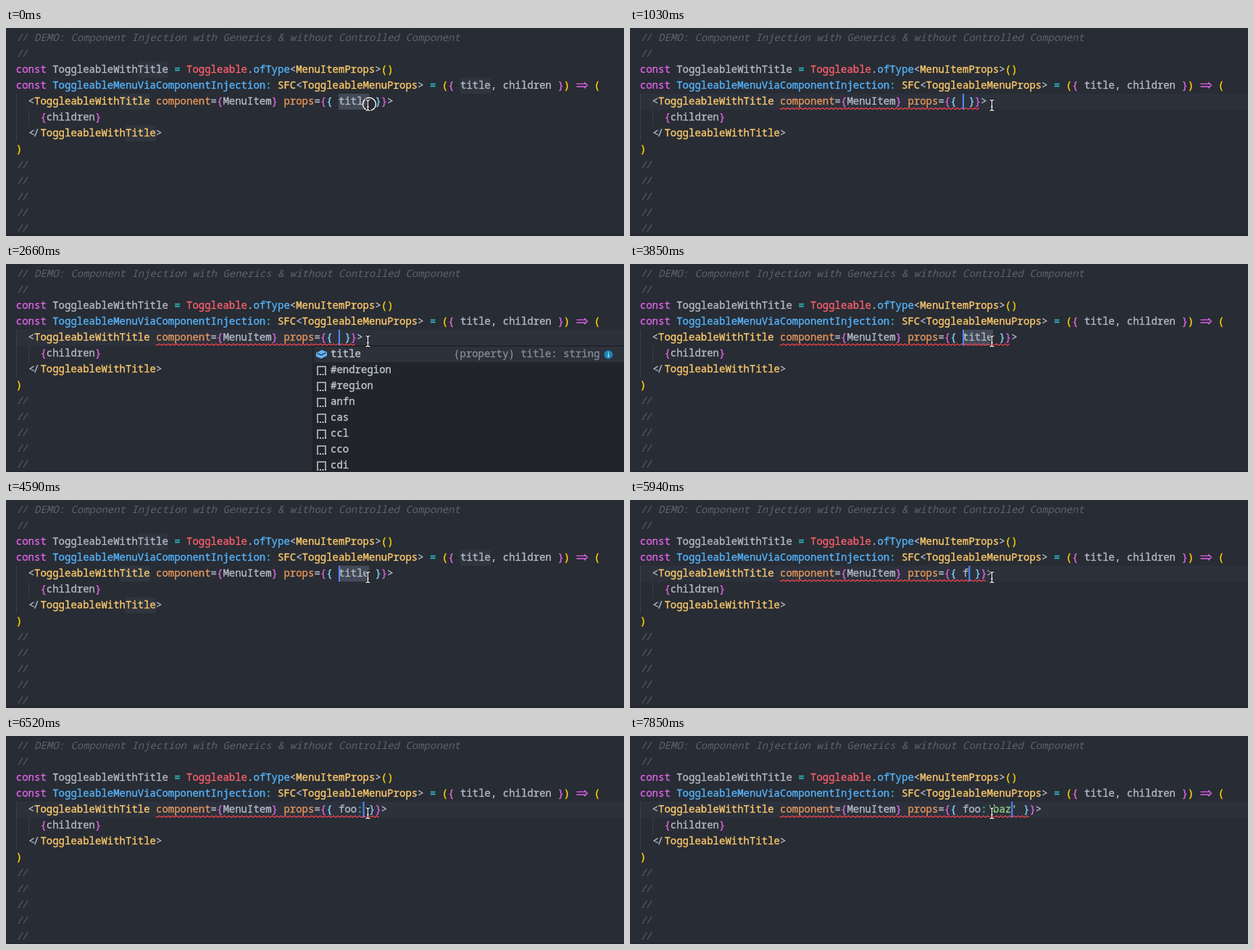
Write an HTML page that moves like this. It is 853 px wide and 288 px high and loops after 8 s.

```html
<!DOCTYPE html>
<html lang="en">
<head>
<meta charset="utf-8">
<title>Editor typing</title>
<style>
html, body { margin: 0; width: 100%; height: 100%; overflow: hidden; background: #282c34; }
svg { display: block; }
text {
  font: 14px "Noto Sans Mono", "DejaVu Sans Mono", monospace;
  font-variant-ligatures: none; white-space: pre;
  fill: currentColor; stroke: currentColor; stroke-width: .35px;
}
.comment { font-style: italic; stroke: none; }
</style>
</head>
<body>
<svg id="stage" width="853" height="288" viewBox="0 0 853 288">
  <defs>
    <path id="beam" d="M496.8 99.5Q499.5 99.5 499.5 102V112Q499.5 114.5 496.8 114.5M502.2 99.5Q499.5 99.5 499.5 102M499.5 112Q499.5 114.5 502.2 114.5M498.2 109H500.8"/>
  </defs>
  <rect width="853" height="288" fill="#282c34"/>
  <rect y="286" width="853" height="2" fill="#23272e"/>
  <g id="back"></g>
  <path d="M14.5 91V157M31.5 113V135" stroke="#3b4048"/>
  <g id="code"></g>
  <g id="edit"></g>
  <g id="popup"></g>
  <circle id="ring" cx="501.5" cy="105.5" r="9" fill="#282c34" fill-opacity=".65" stroke="#fff" stroke-width="1.4"/>
  <g fill="none" stroke-linecap="round">
    <use href="#beam" stroke="#111" stroke-width="2.8"/>
    <use href="#beam" stroke="#fff" stroke-width="1.2"/>
  </g>
</svg>
<script>
const LOOP = 8000, CELL = 8.4, LEFT = 13.8, ROW = 22;
const color = {
  plain: '#b4bbc8', comment: '#5c6370', keyword: '#dd62e6', type: '#fcc96c', name: '#55b4fb',
  object: '#fb5f6c', attr: '#e5975c', op: '#2cc4d2', string: '#8fd07c',
  gold: '#ffd700', pink: '#e065e0', sky: '#87cefa'
};
const $ = id => document.getElementById(id);
const colX = col => LEFT + col * CELL;
const rowY = row => 3 + row * ROW;
const escapeText = s => s.replace(/&/g, '&amp;').replace(/</g, '&lt;');

const label = (x, y, s, ink, cls = '') =>
  `<text x="${x.toFixed(2)}" y="${y}" color="${ink}" class="${cls}">${escapeText(s)}</text>`;
const box = (x, y, w, h, fill) =>
  `<rect x="${x}" y="${y}" width="${w}" height="${h}" fill="${fill}"/>`;

// Lays out [text, colour] pairs on the character grid.
function line(row, col, tokens) {
  let out = '';
  for (const [s, key] of tokens) {
    if (s.trim()) out += label(colX(col), rowY(row) + 15, s, color[key]);
    col += s.length;
  }
  return out;
}

function slashes(row) {
  const y = rowY(row) + 15;
  return label(colX(0) + .8, y, '/', color.comment, 'comment') +
    label(colX(1) - .8, y, '/', color.comment, 'comment');
}

function staticCode() {
  const comments = [0, 1, 8, 9, 10, 11, 12].map(slashes).join('');
  const title = 'DEMO: Component Injection with Generics & without Controlled Component';
  const from = colX(92) + .8, to = colX(94) - 1;
  const arrow = `<path d="M${from} 77.4H${to - 2.4}M${from} 81.2H${to - 2.4}` +
    `M${to - 4.2} 75.2L${to} 79.3L${to - 4.2} 83.4" fill="none" stroke="${color.keyword}" stroke-width="1.4"/>`;
  return comments + label(colX(3), 18, title, color.comment, 'comment') +
    line(2, 0, [['const ', 'keyword'], ['ToggleableWithTitle ', 'plain'], ['= ', 'op'],
      ['Toggleable', 'object'], ['.', 'plain'], ['ofType', 'name'], ['<', 'plain'],
      ['MenuItemProps', 'type'], ['>', 'plain'], ['()', 'gold']]) +
    line(3, 0, [['const ', 'keyword'], ['ToggleableMenuViaComponentInjection', 'name'], [': ', 'op'],
      ['SFC', 'type'], ['<', 'plain'], ['ToggleableMenuProps', 'type'], ['> ', 'plain'], ['= ', 'op'],
      ['(', 'gold'], ['{ ', 'pink'], ['title, children ', 'plain'], ['}', 'pink'], [')', 'gold'],
      ['    ', 'plain'], ['(', 'gold']]) + arrow +
    line(4, 2, [['<', 'plain'], ['ToggleableWithTitle ', 'type'], ['component', 'attr'], ['=', 'plain'],
      ['{', 'pink'], ['MenuItem', 'plain'], ['} ', 'pink'], ['props', 'attr'], ['=', 'plain'],
      ['{', 'pink'], ['{', 'sky']]) +
    line(5, 4, [['{', 'pink'], ['children', 'plain'], ['}', 'pink']]) +
    label(colX(2) + .6, 150, '<', color.plain) + label(colX(3) - 1.4, 150, '/', color.plain) +
    line(6, 4, [['ToggleableWithTitle', 'type'], ['>', 'plain']]) +
    line(7, 0, [[')', 'gold']]);
}

// Each entry changes part of the editor state from its time on.
const steps = [
  [0, { text: 'title', caret: -1, selected: true, marks: true, wave: false, list: '', detail: false, ring: true }],
  [150, { ring: false }],
  [590, { caret: 0 }],
  [740, { text: '', selected: false, marks: false }],
  [1030, { wave: true }],
  [1180, { caret: -1, list: 'all' }],
  [1620, { caret: 0 }],
  [2070, { caret: -1 }],
  [2220, { detail: true }],
  [2660, { caret: 0 }],
  [3110, { caret: -1 }],
  [3710, { text: 'title', caret: 0, selected: true }],
  [3850, { list: '', detail: false }],
  [4150, { caret: -1 }],
  [4300, { wave: false }],
  [4590, { caret: 0, marks: true }],
  [5040, { text: '', selected: false, marks: false }],
  [5340, { wave: true }],
  [5490, { caret: -1 }],
  [5940, { text: 'f', caret: 1 }],
  [6090, { list: 'loops' }],
  [6230, { text: 'fo', caret: 2 }],
  [6380, { text: 'foo', caret: 3, list: 'last' }],
  [6520, { text: 'foo:', caret: 4, list: '' }],
  [6820, { text: "foo:''", caret: 5 }],
  [7410, { text: "foo:'b'", caret: 6 }],
  [7710, { text: "foo:'ba'", caret: 7 }],
  [7850, { text: "foo:'baz'", caret: 8 }]
];

const lists = {
  all: ['title', '#endregion', '#region', 'anfn', 'cas', 'ccl', 'cco', 'cdi'],
  loops: ['fof', 'for', 'foreach', 'forin', 'forof', 'fre', 'fin', 'function'],
  last: ['forof']
};

function wave(endCol) {
  const start = colX(23), end = Math.min(colX(endCol), 552);
  let d = `M${start} 111.4`;
  for (let x = start + 1.8, up = false; x <= end; x += 3, up = !up) d += `L${x} ${up ? 110.6 : 112.8}`;
  return `<path d="${d}" fill="none" stroke="#f4434c" stroke-width="1.2"/>`;
}

function background(s) {
  let out = s.selected ? '' : box(14, 91, 839, ROW, '#2c313c');
  if (s.marks) {
    for (const [row, col] of [[2, 20], [3, 73], [4, 17], [6, 18]])
      out += box(colX(col), rowY(row), 5 * CELL, ROW, '#2f353f');
  }
  if (s.selected) out += box(colX(53), 91, 5 * CELL, ROW, '#434a57');
  return out;
}

function editedCode(s) {
  const [, key, colon, string] = s.text.match(/^(\w*)(:?)(.*)$/);
  const endCol = 53 + s.text.length + 3;
  let out = line(4, 53, [[key, 'plain'], [colon, 'op'], [string, 'string'], [' ', 'plain'],
    ['}', 'sky'], ['}', 'pink'], ['>', 'plain']]);
  if (s.wave) out += wave(endCol);
  if (s.caret >= 0) out += box(colX(53 + s.caret), 91, 2, ROW, '#528bff');
  return out;
}

function itemIcon(name, y) {
  if (name === 'title') {
    return `<path d="M428 ${y - 2}L436 ${y - 6}L443 ${y - 3}V${y + 2}L435 ${y + 6}L428 ${y + 3}Z" fill="#63b5f6"/>` +
      `<path d="M429.5 ${y - 1.5}L435 ${y + 1}L441.5 ${y - 2.2}" fill="none" stroke="#21252b" stroke-width="1.2"/>`;
  }
  return `<path d="M430 ${y + 5}V${y - 5}H441V${y + 5}" fill="none" stroke="#c5c8ce" stroke-width="1.5"/>` +
    `<path d="M429.3 ${y + 6}H442" stroke="#c5c8ce" stroke-width="1.8" stroke-dasharray="2 1.6"/>`;
}

function suggestions(s) {
  if (!s.list) return '';
  const items = lists[s.list];
  let out = box(423.5, 113, 440, items.length * ROW + 2, '#181a1f') +
    box(424.5, 114, 440, items.length * ROW, '#21252b') + box(424.5, 114, 440, ROW, '#2c313a');
  items.forEach((name, i) => {
    const y = 125 + i * ROW;
    out += itemIcon(name, y) + label(448, y + 4, name, '#c3c8d1');
  });
  if (s.detail) {
    out += label(618, 129, '(property) title: string', '#858b96') +
      '<circle cx="831.5" cy="125.5" r="6" fill="#1c86b5"/>' +
      '<path d="M831.5 124.5V129M831.5 121.8V123.2" stroke="#d5edf7" stroke-width="1.4"/>';
  }
  return out;
}

function render(time) {
  const state = Object.assign({}, ...steps.filter(([at]) => at <= time).map(([, change]) => change));
  $('back').innerHTML = background(state);
  $('edit').innerHTML = editedCode(state);
  $('popup').innerHTML = suggestions(state);
  $('ring').style.display = state.ring ? '' : 'none';
}

$('code').innerHTML = staticCode();
const begin = performance.now();
let shown = -1;
function tick() {
  const time = (performance.now() - begin) % LOOP;
  const current = steps.filter(([at]) => at <= time).length;
  if (current !== shown) render(time);
  shown = current;
  requestAnimationFrame(tick);
}
tick();
</script>
</body>
</html>
```
